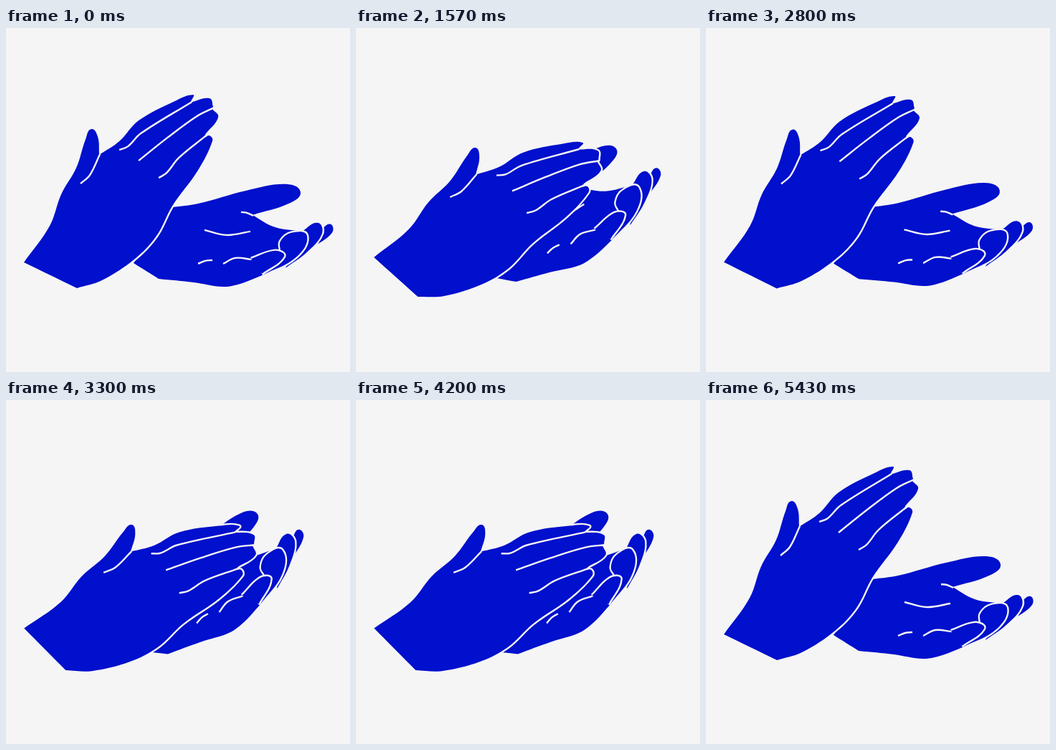
An HTML page that plays this animation: 480x480 px, repeating every 5460 ms.

```html
<!DOCTYPE html>
<html lang="en">
<head>
<meta charset="utf-8">
<title>Clapping hands</title>
<style>
  html, body { margin: 0; width: 100%; height: 100%; overflow: hidden; background: #f5f5f5; }
  svg { display: block; width: 100%; height: 100%; }
  .shape { fill: #0010cc; stroke: #f5f5f5; stroke-width: 4.8; stroke-linejoin: round; paint-order: stroke; }
  .line { fill: none; stroke: #f5f5f5; stroke-width: 2.4; stroke-linejoin: round; }
</style>
</head>
<body>
<svg viewBox="0 0 480 480">
  <g id="right"></g>
  <g id="left"></g>
</svg>
<script>
const LOOP = 5460, FRAME = 100 / 3, CLAP = 900;
const OPENING = { start: 500, length: 440 };
const CLOSING = { start: 40, length: 300 };
const LEFT = { el: document.getElementById('left'), turn: 20.1, pivot: '50 323.5' };
const RIGHT = { el: document.getElementById('right'), turn: -27.1, pivot: '229 324.4' };

// Smooth curve through key points; "|" separates runs that meet in a corner.
function curve(text) {
  return text.split('|').map((run, index) => {
    const p = run.trim().split(/\s+/).map(pair => pair.split(',').map(Number));
    const tangent = i => {
      const a = p[Math.max(0, i - 1)], b = p[Math.min(p.length - 1, i + 1)];
      const length = Math.hypot(b[0] - a[0], b[1] - a[1]);
      return [(b[0] - a[0]) / length, (b[1] - a[1]) / length];
    };
    let d = (index ? 'L' : 'M') + p[0];
    for (let i = 0; i < p.length - 1; i++) {
      const a = p[i], b = p[i + 1], ta = tangent(i), tb = tangent(i + 1);
      const reach = Math.hypot(b[0] - a[0], b[1] - a[1]) * 0.36;
      d += `C${a.map((v, k) => v + ta[k] * reach)} ${b.map((v, k) => v - tb[k] * reach)} ${b}`;
    }
    return d;
  }).join('');
}

function draw(hand, kind, ...outlines) {
  for (const text of outlines) {
    const path = document.createElementNS('http://www.w3.org/2000/svg', 'path');
    path.setAttribute('class', kind);
    path.setAttribute('d', curve(text));
    hand.el.append(path);
  }
}

// Palm with thumb, then fingers from back to front
draw(RIGHT, 'shape',
  `178,328 232,250 | 232,250 268,245 335,227 390,218 411,229 395,245 344,261 |
   344,261 375,278 412,284 | 412,284 358,345 | 358,345 330,356 303,361 262,355 213,350 | 213,350 178,328`,
  '440,281 453,274 455,286 427,307',
  '413,284 435,272 441,287 420,313 390,335',
  '383,311 383,298 398,286 420,290 405,320 358,345',
  '342,322 376,311 388,319 357,343');
draw(RIGHT, 'line',
  '328,257 336,258 345,262',
  '277,282 308,289 341,284',
  '268,329 278,325 288,324',
  '303,329 320,321 342,323');

draw(LEFT, 'shape',
  `25,327 61,276 77,232 98,195 111,155 119,141 128,152 130,177 |
   130,177 158,158 185,129 235,102 261,93 258,102 | 257,104 284,98 289,110 |
   288,113 296,124 278,148 | 277,153 284,150 288,157 268,198 232,248 210,290 180,322 134,352 99,363 |
   99,363 25,327`);
draw(LEFT, 'line',
  '104,217 117,205 131,176',
  '158,170 170,165 188,147 259,103',
  '185,185 225,153 266,123 290,111',
  '213,209 224,202 241,181 279,150');

function ease({ start, length }, time) {
  const u = Math.min(1, Math.max(0, (time - start) / length));
  const half = v => (2 * v) ** 3.2 / 2;
  return u < 0.5 ? half(u) : 1 - half(1 - u);
}

function closedness(time) {
  let phase = time % CLAP;
  if (phase < CLOSING.start) phase += CLAP;
  return phase < OPENING.start ? ease(CLOSING, phase) : 1 - ease(OPENING, phase);
}

function render(now) {
  const time = Math.floor((now % LOOP + 3.4) / FRAME) * FRAME;
  const amount = closedness(time);
  for (const hand of [LEFT, RIGHT])
    hand.el.setAttribute('transform', `rotate(${hand.turn * amount} ${hand.pivot})`);
}

let origin;
function tick(now) {
  origin ??= now;
  render(now - origin);
  requestAnimationFrame(tick);
}
render(0);
requestAnimationFrame(tick);
</script>
</body>
</html>
```
